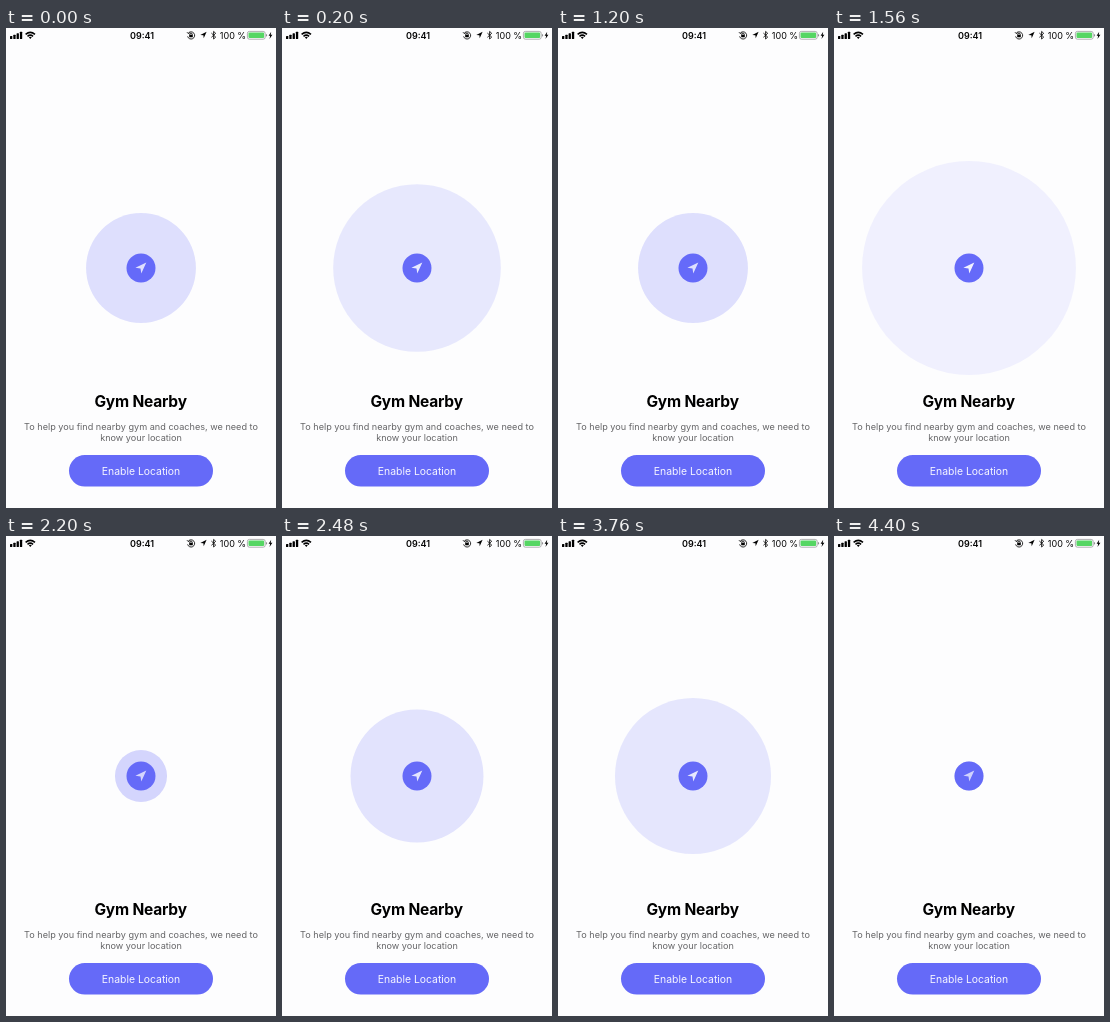
An HTML page that plays this animation: 270x480 px, repeating every 4.56 s.

```html
<!DOCTYPE html>
<html lang="en">
<head>
<meta charset="utf-8">
<title>Gym Nearby</title>
<style>
  html, body { margin: 0; width: 100%; height: 100%; overflow: hidden; background: #fdfdfe; }
  svg { display: block; width: 100%; height: 100%; }
  text { font-family: Inter, "Liberation Sans", sans-serif; text-anchor: middle; }
  .brand { fill: #656af8; }
  .status { font-size: 9px; fill: #050505; }
  .line { fill: none; stroke: #111; stroke-width: .9; }
  .title { font-size: 15.5px; font-weight: 700; letter-spacing: -.2px; }
  .note { font-size: 9.15px; fill: #656567; }
  .label { font-size: 10.4px; fill: #f6f6ff; }
</style>
</head>
<body>
<svg viewBox="0 0 270 480">
  <!-- status bar -->
  <g>
    <rect x="4" y="8" width="2.3" height="3" rx=".5"/>
    <rect x="7.3" y="6.8" width="2.3" height="4.2" rx=".5"/>
    <rect x="10.6" y="5.3" width="2.3" height="5.7" rx=".5"/>
    <rect x="13.9" y="3.7" width="2.3" height="7.3" rx=".5"/>
    <g fill="none" stroke="#000" stroke-width="1.5">
      <path d="M19.6 6.4Q24.3 2.3 29 6.4M21.5 8.3Q24.3 6 27.1 8.3"/>
    </g>
    <path d="M22.8 9.2Q24.3 8.2 25.8 9.2L24.3 10.9Z"/>
    <text class="status" x="136" y="10.6" font-weight="600">09:41</text>
    <path class="line" d="M182.4 5A3.6 3.6 0 1 1 181.6 8.4M181 4.2L182.2 5.6L183.8 4.6"/>
    <path class="line" d="M183.8 7V6.3A1.2 1.2 0 0 1 186.2 6.3V7" stroke-width=".7"/>
    <rect x="183.2" y="6.8" width="3.6" height="2.5" rx=".3"/>
    <path d="M200.6 3.8L194.3 6.9L197.4 7.2L197.7 10.3Z"/>
    <path class="line" d="M205.4 5.1L209.7 9.1L207.6 11V3.4L209.7 5.3L205.4 9.3"/>
    <text class="status" x="227" y="10.6">100 %</text>
    <rect x="241.4" y="3.4" width="17.8" height="7.8" rx="2" fill="none" stroke="#8e8e90" stroke-width=".7"/>
    <rect x="242.5" y="4.5" width="15.6" height="5.6" rx="1" fill="#55d663"/>
    <path d="M260 6V8.7Q261.2 8.2 261.2 7.3T260 6Z" fill="#8e8e90"/>
    <path d="M265.2 3.8L262.6 7.8H264.2L263.5 10.9L266.4 6.7H264.7Z"/>
  </g>

  <!-- location beacon -->
  <circle class="brand" cx="135" cy="240" r="14.5"/>
  <path d="M140.3 234.6L129.4 239.7L134.5 240.5L135.3 245.6Z" fill="#fff"/>
  <circle class="brand" id="pulse" cx="135" cy="240" r="14.45"/>

  <text class="title" x="134.6" y="378.6">Gym Nearby</text>
  <text class="note" x="135" y="402.2">To help you find nearby gym and coaches, we need to</text>
  <text class="note" x="135" y="413.4">know your location</text>
  <rect class="brand" x="63" y="427" width="144" height="31.6" rx="15.8"/>
  <text class="label" x="135" y="446.6">Enable Location</text>
</svg>
<script>
  const LOOP = 4560, STEP = 40;
  const PERIOD = 1200, OFFSET = 400, DELAY = 120, GROW = 900;
  const RADIUS = 14.45, SCALE = 10, ALPHA = 0.3;
  const pulse = document.getElementById('pulse');
  const start = performance.now();

  // Each pulse rests on the button, then expands and fades linearly.
  function draw() {
    const elapsed = Math.max(0, performance.now() - start) % LOOP;
    const time = Math.floor(elapsed / STEP) * STEP;
    const phase = (time + OFFSET) % PERIOD;
    const k = Math.min(1, Math.max(0, (phase - DELAY) / GROW));
    pulse.setAttribute('r', RADIUS * (1 + (SCALE - 1) * k));
    pulse.setAttribute('opacity', ALPHA * (1 - k));
    requestAnimationFrame(draw);
  }
  draw();
</script>
</body>
</html>
```
